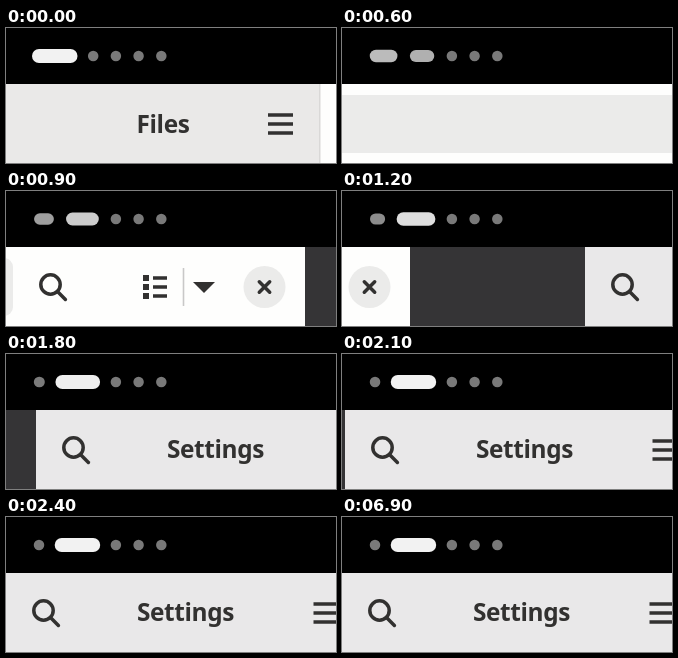
Animation of 330x135 px, one loop 8000 ms. Source, as an HTML page:

```html
<!DOCTYPE html>
<html lang="en">
<head>
<meta charset="utf-8">
<title>Workspace switch</title>
<style>
  html, body { margin: 0; width: 100%; height: 100%; overflow: hidden; background: #000; }
  svg { display: block; width: 330px; height: 135px; }
  text { font: 700 24.4px "Noto Sans", sans-serif; letter-spacing: -0.4px; fill: #323130; text-anchor: middle; }
  .line { fill: none; stroke: #323130; stroke-width: 3.5; }
  .solid { fill: #323130; }
</style>
</head>
<body>
<svg viewBox="0 0 330 135">
  <defs>
    <g id="search" class="line">
      <circle cx="11.5" cy="11.5" r="9.7"/>
      <path d="M18.5 18.5L26.4 26.4" stroke-linecap="round"/>
    </g>
    <path id="menu" class="line" d="M0 5.1h25M0 14h25M0 22.9h25"/>
  </defs>

  <rect y="56" width="330" height="79" fill="#353436"/>

  <g id="files">
    <rect y="56" width="1325" height="79" fill="#fefefd"/>
    <rect y="56" width="314" height="79" fill="#eae9e8"/>
    <rect x="313" y="56" width="1.5" height="79" fill="#d9d8d7"/>
    <text x="157" y="105">Files</text>
    <use href="#menu" x="262" y="82"/>
    <!-- toolbar at the window's right end -->
    <g transform="translate(1026)">
      <rect x="-500" y="67" width="507" height="58" rx="9" fill="#ebebea"/>
      <use href="#search" x="33" y="82"/>
      <path class="solid" d="M137 84h6v6h-6zM137 93h6v6h-6zM137 102h6v6h-6z"/>
      <path class="line" d="M147 87h14M147 96h14M147 105h14"/>
      <path d="M177.5 77v38" stroke="#c9c8c8" stroke-width="1.6"/>
      <path class="solid" d="M187 91h22l-11 11z"/>
      <circle cx="258.5" cy="96" r="21" fill="#ebebea"/>
      <path class="line" stroke-linecap="round" d="M253.3 90.8l10.4 10.4M263.7 90.8l-10.4 10.4"/>
    </g>
  </g>

  <g id="settings">
    <rect y="56" width="359" height="79" fill="#e9e8e9"/>
    <use href="#search" x="26" y="82"/>
    <text x="179.5" y="104">Settings</text>
    <use href="#menu" x="307.5" y="82"/>
  </g>

  <rect width="330" height="56"/>
  <g id="dots" fill="#f2f2f2"><rect/><rect/><rect/><rect/><rect/></g>
</svg>

<script>
  const LOOP = 8000, STEP = 300, PAGE = 1500;
  const SIZE = 14, GAP = 8.7;
  // distance left to the second workspace at each step
  const LEFT = [PAGE, PAGE, 820, 474, 243, 100, 30, 3];
  const byId = id => document.getElementById(id);
  const files = byId('files'), settings = byId('settings');
  const dots = [...byId('dots').children];

  function drawDots(page) {
    let x = 26;
    dots.forEach((dot, i) => {
      const grow = Math.max(0, 1 - Math.abs(i - page));
      const slot = SIZE * (1 + 2.25 * grow);
      const scale = 0.75 + 0.25 * grow;
      const w = slot * scale, h = SIZE * scale;
      const set = (k, v) => dot.setAttribute(k, v);
      set('x', x + (slot - w) / 2);
      set('y', 28 - h / 2);
      set('width', w);
      set('height', h);
      set('rx', h / 2);
      set('opacity', 0.5 + 0.5 * grow);
      x += slot + GAP;
    });
  }

  function draw(t) {
    const left = LEFT[Math.floor(t / STEP)] ?? 0;
    files.setAttribute('transform', `translate(${left - PAGE})`);
    settings.setAttribute('transform', `translate(${left})`);
    drawDots(1 - left / PAGE);
  }

  function tick() {
    draw(performance.now() % LOOP);
    requestAnimationFrame(tick);
  }
  tick();
</script>
</body>
</html>
```
